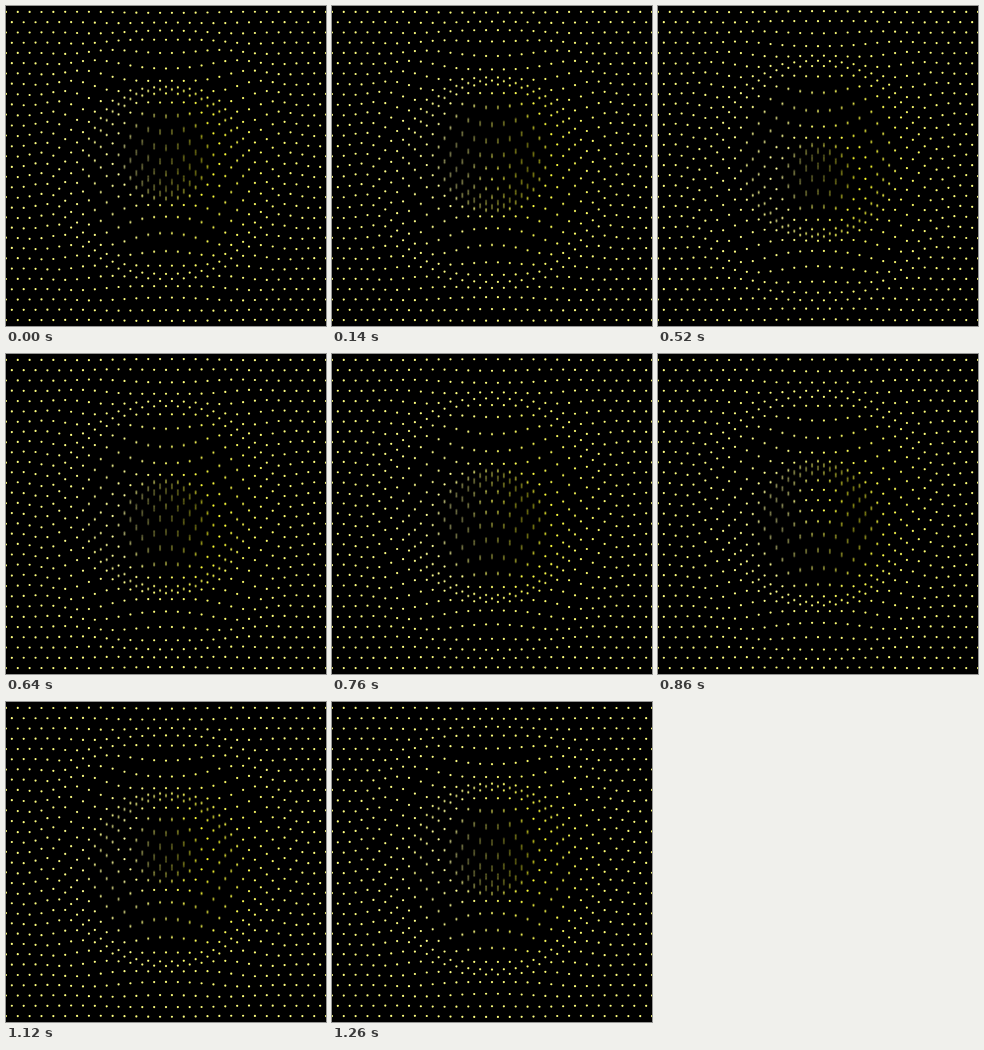
Animation, 320 px wide and 320 px high, one loop 1280 ms. Source, as an HTML page with a canvas:

```html
<!DOCTYPE html>
<html lang="en">
<head>
<meta charset="utf-8">
<title>Ripple of dots</title>
<style>
  html, body { margin: 0; width: 100%; height: 100%; overflow: hidden; background: #000; }
  canvas { display: block; width: 320px; height: 320px; }
</style>
</head>
<body>
<canvas id="stage" width="320" height="320"></canvas>
<script>
const ctx = document.getElementById('stage').getContext('2d');
const SIZE = 320, MID = SIZE / 2, LOOP = 1280, STEP = 20;
const ROW = 10.27, COL = ROW * 2 / Math.sqrt(3);
const AMP = 14, REACH = 110, START = 0.59;
const SAMPLES = 5, SHUTTER = 80, RADIUS = 1.1;

// Triangular lattice with level rows; each dot only moves up and down.
const dots = [];
for (let j = -16; j <= 16; j++) {
  const shift = j % 2 ? COL / 2 : 0;
  for (let i = -14; i <= 14; i++) {
    const dx = i * COL + shift, dy = j * ROW;
    const r = Math.hypot(dx, dy);
    const near = Math.exp(-((r / 80) ** 2));
    const side = Math.max(-1, Math.min(1, dx / 40));
    const blue = Math.round(125 - near * (40 + 85 * side));
    dots.push({
      x: MID + dx,
      y: MID + dy,
      amp: AMP * Math.exp(-((r / REACH) ** 3)),
      lag: 0.002815 * r ** 1.65,
      blur: SHUTTER * near,
      color: `rgba(255,255,${blue},${1 / SAMPLES})`
    });
  }
}

function draw(t) {
  ctx.globalCompositeOperation = 'source-over';
  ctx.fillStyle = '#000';
  ctx.fillRect(0, 0, SIZE, SIZE);
  // Summed samples across the shutter blur the inner dots into dim streaks.
  ctx.globalCompositeOperation = 'lighter';
  for (const d of dots) {
    ctx.fillStyle = d.color;
    for (let s = 0; s < SAMPLES; s++) {
      const when = t + d.blur * (s / (SAMPLES - 1) - 0.5);
      const angle = 2 * Math.PI * when / LOOP - d.lag + START;
      ctx.beginPath();
      ctx.arc(d.x, d.y + d.amp * Math.sin(angle), RADIUS, 0, 2 * Math.PI);
      ctx.fill();
    }
  }
}

const begin = performance.now();
let last = -1;
function tick() {
  const t = Math.floor((performance.now() - begin) % LOOP / STEP) * STEP;
  if (t !== last) draw(last = t);
  requestAnimationFrame(tick);
}
tick();
</script>
</body>
</html>
```
